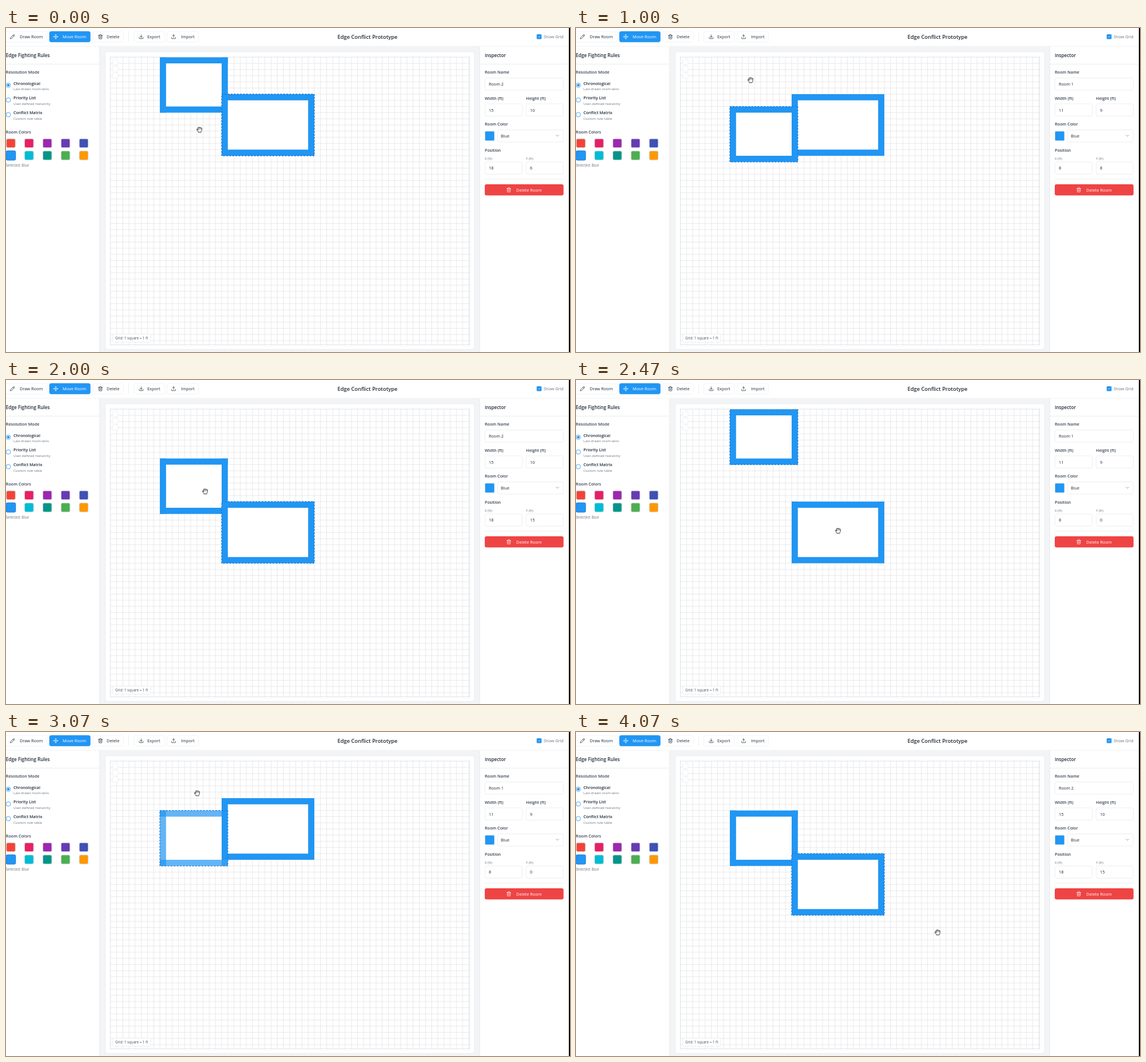
Animation, 986 px wide and 568 px high, one loop 4.14 s. Source, as an HTML page:

```html
<!DOCTYPE html>
<html lang="en">
<head>
<meta charset="utf-8">
<title>Edge Conflict Prototype</title>
<style>
  html, body { margin: 0; width: 100%; height: 100%; overflow: hidden; background: #fff; }
  svg { display: block; width: 986px; height: 568px; font-family: "Open Sans", "Noto Sans", sans-serif; }
  .icon { fill: none; stroke-width: 2; stroke-linecap: round; stroke-linejoin: round; }
</style>
</head>
<body>
<svg id="stage" viewBox="0 0 986 568"></svg>
<script>
const BLUE = '#2196f3', LINE = '#e5e7eb', INK = '#1f2937', LABEL = '#374151', MUTED = '#6b7280';
const CELL = 10.8, FPS = 15, LOOP = 4140;
const stage = document.getElementById('stage');

const rect = (x, y, w, h, fill, stroke = 'none', r = 0, sw = .7) =>
  `<rect x="${x}" y="${y}" width="${w}" height="${h}" rx="${r}" fill="${fill}" stroke="${stroke}" stroke-width="${sw}"/>`;
const text = (str, x, mid, size, fill = INK, weight = 400, extra = '') =>
  `<text x="${x}" y="${mid + size * .36}" font-size="${size}" font-weight="${weight}" fill="${fill}" ${extra}>${str}</text>`;
const line = (x1, y1, x2, y2, color = LINE) =>
  `<path d="M${x1} ${y1}L${x2} ${y2}" stroke="${color}" stroke-width=".8"/>`;
const icon = (d, cx, cy, color = INK, size = 9) =>
  `<path class="icon" d="${d}" stroke="${color}" transform="translate(${cx - size / 2} ${cy - size / 2}) scale(${size / 24})"/>`;
const label = (str, x, mid) => text(str, x, mid, 7.2, LABEL, 600);
const field = (x, y, w, h = 21.5) => rect(x, y, w, h, '#fff', LINE, 3);

const ICONS = {
  pencil: 'M17 3a2.8 2.8 0 0 1 4 4L7.5 20.5 2 22l1.500-5.500ZM14.500 5.500l4 4',
  move: 'M12 2v20M2 12h20M9 5l3-3 3 3M9 19l3 3 3-3M5 9l-3 3 3 3M19 9l3 3-3 3',
  trash: 'M3 6h18M19 6v14a2 2 0 0 1-2 2H7a2 2 0 0 1-2-2V6M8 6V4a2 2 0 0 1 2-2h4a2 2 0 0 1 2 2v2M10 11v6M14 11v6',
  download: 'M21 15v4a2 2 0 0 1-2 2H5a2 2 0 0 1-2-2v-4M7 10l5 5 5-5M12 15V3',
  upload: 'M21 15v4a2 2 0 0 1-2 2H5a2 2 0 0 1-2-2v-4M7 8l5-5 5 5M12 3v12',
  chevron: 'M6 9l6 6 6-6',
  check: 'M5 12l5 5 9-10'
};

function button(name, x, w, iconName, iconX, textX, primary) {
  const ink = primary ? '#fff' : INK;
  return rect(x, 6, w, 18.5, primary ? BLUE : '#fff', primary ? BLUE : '#eceef1', 3) +
    icon(ICONS[iconName], iconX, 15.3, ink) + text(name, textX, 15.4, 7.4, ink, 500);
}

function toolbar() {
  return rect(0, 0, 986, 32, '#fff') + line(0, 32.3, 984, 32.3) +
    button('Draw Room', -3, 75, 'pencil', 11.3, 24) +
    button('Move Room', 76, 71.3, 'move', 87, 99, true) +
    button('Delete', 152, 53.5, 'trash', 165, 176) +
    line(214.3, 6, 214.3, 24) +
    button('Export', 223.500, 53.5, 'download', 236.3, 247) +
    button('Import', 281.500, 55, 'upload', 293, 306) +
    text('Edge Conflict Prototype', 632, 15.4, 9.3, INK, 600, 'text-anchor="middle"') +
    rect(927.7, 11, 8.600, 8.600, BLUE, 'none', 1.500) + icon(ICONS.check, 932, 15.3, '#fff', 7) +
    text('Show Grid', 940, 15.4, 7.25, MUTED);
}

function sidebar() {
  const modes = [
    ['Chronological', 'Last drawn room wins'],
    ['Priority List', 'User-defined hierarchy'],
    ['Conflict Matrix', 'Custom rule table']
  ];
  const colors = ['#f44336', '#e91e63', '#9c27b0', '#673ab7', '#3f51b5', BLUE, '#00bcd4', '#009688', '#4caf50', '#ff9800'];
  return rect(0, 32.700, 163.3, 536, '#fff') + line(163.5, 32, 163.5, 568) + line(0, 63.3, 163, 63.3) +
    text('Edge Fighting Rules', -.3, 47.800, 8.25, INK, 600) +
    label('Resolution Mode', -.2, 77.8) +
    modes.map(([name, hint], i) => {
      const y = 97 + i * 25.8;
      return `<circle cx="4" cy="${y + 3.300}" r="3.9" fill="#fff" stroke="${BLUE}" stroke-width=".8"/>` +
        (i ? '' : `<circle cx="4" cy="${y + 3.300}" r="2.3" fill="${BLUE}"/>`) +
        text(name, 13, y, 7.1, INK, 600) + text(hint, 13, y + 10, 6.05, MUTED);
    }).join('') +
    label('Room Colors', -.2, 182) +
    colors.map((c, i) => {
      const cx = 8.5 + i % 5 * 31.85, cy = i < 5 ? 202 : 223.5, s = c === BLUE ? 16.6 : 15.6;
      return rect(cx - s / 2, cy - s / 2, s, s, c, c === BLUE ? '#1976d2' : '#d1d5db', 2.5, 1);
    }).join('') +
    text('Selected: Blue', -.3, 241, 6.2, MUTED);
}

function gridLines() {
  let d = '';
  for (let x = 182.6 + CELL; x < 811; x += CELL) d += `M${x} 51V555.5`;
  for (let y = 51.2 + CELL; y < 555; y += CELL) d += `M182.500 ${y}H811`;
  return `<path d="${d}" stroke="#e2e2e4" stroke-width=".75"/>`;
}

function board() {
  return rect(164, 32.8, 664, 536, '#f3f4f6') +
    rect(173.5, 41.5, 645.5, 522, '#fff', LINE, 4) +
    gridLines() +
    [55, 66.700, 78.400].map(y => rect(186.5, y, 9.4, 9.4, '#fff', '#e8eaed', 1.5)).join('') +
    `<clipPath id="board"><rect x="182" y="51" width="629" height="505"/></clipPath>
     <g clip-path="url(#board)"><g transform="translate(182.6 51.2)">
       <g id="room1"></g><g id="room2"></g>
       <rect id="outline" fill="none" stroke="#1976d2" stroke-width="1.3" stroke-dasharray="2.7 2.7"/>
     </g></g>` +
    rect(182.5, 51, 628.3, 504.5, 'none', '#d1d5db') +
    rect(186.5, 536.5, 66.5, 14.3, '#fff', LINE, 2.5) +
    text('Grid: 1 square = 1 ft', 191, 543.800, 6.25, '#4b5563');
}

function inspector() {
  const value = (id, x, y) => text('', x, y, 7.25, INK, 400, `id="${id}"`);
  return rect(828.5, 32.7, 155.5, 536, '#fff') + line(828.3, 32, 828.3, 568) + line(828, 63.3, 984, 63.3) +
    text('Inspector', 837, 47.800, 8.1, INK, 600) +
    label('Room Name', 837, 77.8) + field(837.3, 87.5, 137) + value('name', 844, 98.8) +
    label('Width (ft)', 837, 123.4) + field(837.3, 133, 65.3) + value('width', 844, 144) +
    label('Height (ft)', 909, 123.4) + field(909.3, 133, 65) + value('height', 916, 144) +
    label('Room Color', 837, 168.5) + rect(837.3, 181, 16.6, 16.6, BLUE, LINE, 1.5) +
    field(859.3, 178.5, 115) + text('Blue', 865, 189, 7.25) + icon(ICONS.chevron, 964, 188.8, MUTED, 8.5) +
    label('Position', 837, 214) +
    text('X (ft)', 837, 228.8, 6.1, MUTED) + field(837.3, 234.8, 65.3) + value('posX', 844, 245.8) +
    text('Y (ft)', 909, 228.8, 6.1, MUTED) + field(909.3, 234.8, 65) + value('posY', 916, 245.8) +
    line(837, 265, 975, 265) +
    rect(837, 274, 137.7, 19.5, '#ef4444', 'none', 3) + icon(ICONS.trash, 879, 283.700, '#fff') +
    text('Delete Room', 892, 284, 7.4, '#fff', 500) +
    rect(984, 0, 2, 568, '#000');
}

const hand = `<g id="cursor" stroke="#222" stroke-width=".9" stroke-linejoin="round" stroke-linecap="round">
  <path fill="#fff" d="M-2.400 .8L-3.400-.4C-4.500-1.300-5.300-.2-4.500.7L-2 3.800V4.800H3V3.800C4.300 2.200 4.400.5 4.400-2C4.300-3.200 3-3.200 2.800-2.400C2.700-4 .9-4 .8-3C.6-4.800-1-4.600-1-3.200C-1.400-4.200-2.900-4-2.800-2.600Z"/>
  <path fill="none" stroke-width=".6" d="M-1-3V-.5M.8-3V-.5M2.800-2.400V-.3"/></g>`;

stage.innerHTML = toolbar() + sidebar() + board() + inspector() + hand;

const el = id => document.getElementById(id);
const rooms = [{ x: 8, w: 11, h: 9 }, { x: 18, w: 15, h: 10 }];

rooms.forEach(({ x, w, h }, i) => {
  const cells = (cx, cy, cw, ch, fill) => rect(cx * CELL, cy * CELL, cw * CELL, ch * CELL, fill);
  el('room' + (i + 1)).innerHTML = cells(x, 0, w, h, '#fff') +
    `<g>${cells(x, 0, w, 1, BLUE)}${cells(x, h - 1, w, 1, BLUE)}${cells(x, 0, 1, h, BLUE)}${cells(x + w - 1, 0, 1, h, BLUE)}</g>`;
});

// tick, y of room 1, y of room 2, selected room, y shown in the inspector (differs while dragging)
const layout = [
  [0, 0, 6, 2, 6], [15, 8, 6, 1, 8],
  [24, 8, 15, 2, 6], [25, 8, 15, 2, 15],
  [32, 0, 15, 1, 8], [34, 0, 15, 1, 0],
  [39, 0, 6, 2, 15], [40, 0, 6, 2, 6],
  [46, 8, 6, 1, 0], [47, 8, 6, 1, 8],
  [52, 8, 15, 2, 6], [53, 8, 15, 2, 15]
];
// tick, x, y; the pointer holds still while a room is dragged
const pointer = [
  [0, 338, 178], [4, 338, 178], [9, 274, 74], [11, 305, 91], [15, 305, 91],
  [16, 318, 178], [20, 436, 190], [24, 436, 190], [25, 436, 284], [26, 436, 284],
  [30, 348, 195], [33, 348, 195], [34, 352, 120], [37, 458, 264], [39, 458, 264],
  [40, 458, 167], [45, 334, 107], [46, 334, 107], [47, 334, 193], [49, 434, 185],
  [50, 438.500, 188], [59, 438.800, 188], [60, 534, 268], [61, 632, 351], [63, 632, 351]
];

function pointerAt(tick) {
  const i = pointer.findIndex(key => key[0] > tick);
  const [t0, x0, y0] = pointer[i - 1], [t1, x1, y1] = pointer[i];
  const k = (tick - t0) / (t1 - t0);
  return [x0 + (x1 - x0) * k, y0 + (y1 - y0) * k];
}

function draw(ms) {
  const tick = Math.min(61, Math.floor((ms + 5) * FPS / 1000));
  const [, y1, y2, selected, shownY] = layout.findLast(step => step[0] <= tick);
  const ys = [y1, y2];
  rooms.forEach((_, i) => {
    const group = el('room' + (i + 1));
    const dragging = selected === i + 1 && ys[i] !== shownY;
    group.setAttribute('transform', `translate(0 ${ys[i] * CELL})`);
    for (const wall of group.lastChild.children) wall.setAttribute('opacity', dragging ? .7 : 1);
  });
  const room = rooms[selected - 1];
  const box = { x: room.x, y: ys[selected - 1], width: room.w, height: room.h };
  for (const key in box) el('outline').setAttribute(key, box[key] * CELL);
  const values = { name: 'Room ' + selected, width: room.w, height: room.h, posX: room.x, posY: shownY };
  for (const id in values) el(id).textContent = values[id];
  el('cursor').setAttribute('transform', `translate(${pointerAt(tick)})`);
}

const start = performance.now();
function loop() {
  draw((performance.now() - start) % LOOP);
  requestAnimationFrame(loop);
}
loop();
</script>
</body>
</html>
```
